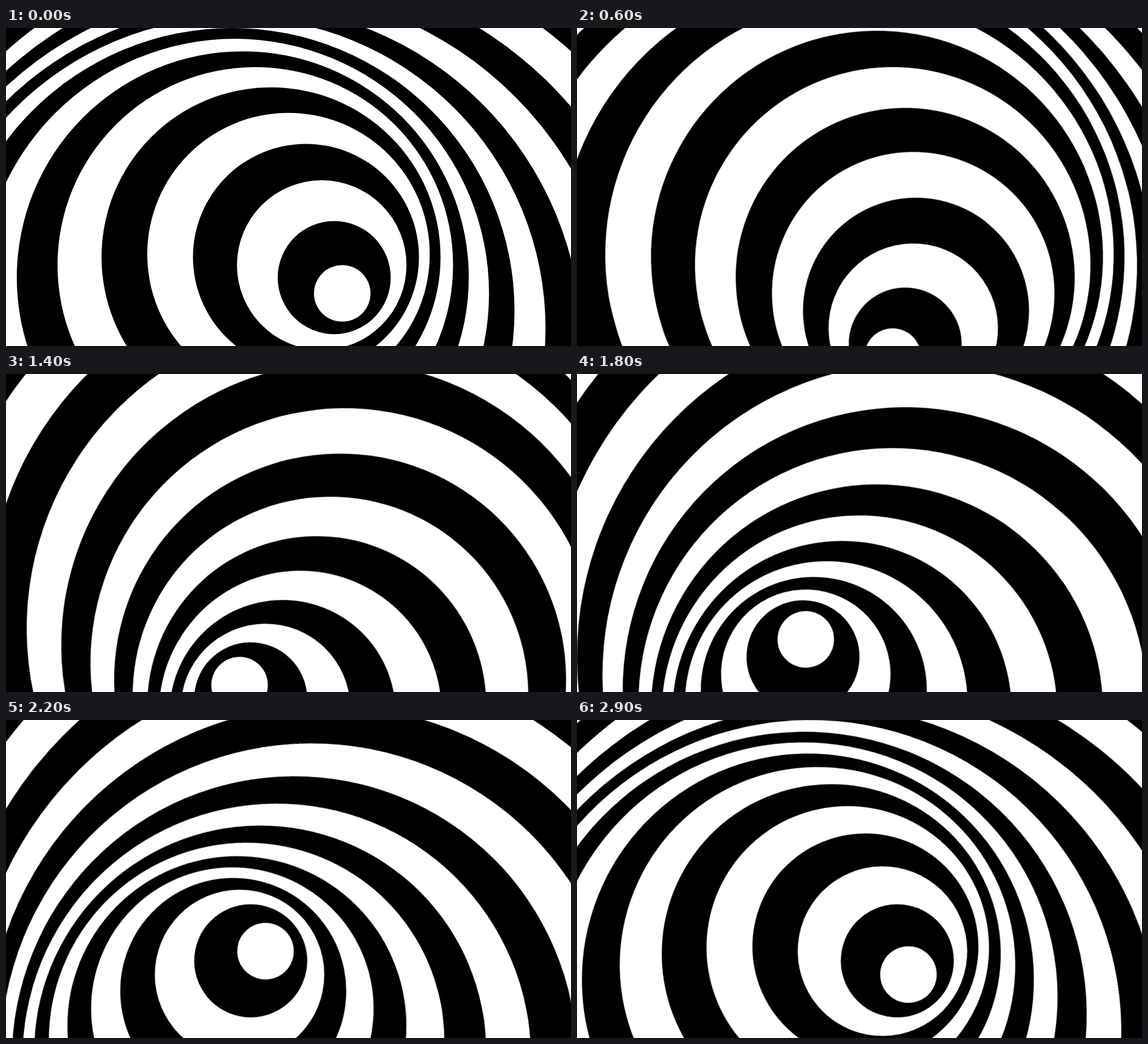
An HTML page for the animation above (3000 ms loop, 998 px wide and 561 px high).

```html
<!DOCTYPE html>
<html lang="en">
<head>
<meta charset="utf-8">
<title>Spiral tunnel</title>
<style>
  html, body { margin: 0; width: 100%; height: 100%; overflow: hidden; background: #fff; }
  svg { display: block; width: 998px; height: 561px; }
  #rings { transform-origin: 499px 499px; animation: spin 3s steps(30) infinite; }
  @keyframes spin { to { transform: rotate(360deg); } }
</style>
</head>
<body>
<svg viewBox="0 0 998 561"><g id="rings"></g></svg>
<script>
  const C = 499, UNIT = 49.9, ORBIT = 99.8, COUNT = 18;
  const rings = document.getElementById('rings');

  // Each ring's centre sits on a small orbit, 18 degrees behind the ring inside it.
  for (let k = COUNT; k > 0; k--) {
    const a = -k * Math.PI / 10;
    const ring = document.createElementNS('http://www.w3.org/2000/svg', 'circle');
    ring.setAttribute('cx', C + ORBIT * Math.cos(a));
    ring.setAttribute('cy', C + ORBIT * Math.sin(a));
    ring.setAttribute('r', k * UNIT);
    ring.setAttribute('fill', k % 2 ? '#fff' : '#000');
    rings.append(ring);
  }
</script>
</body>
</html>
```
